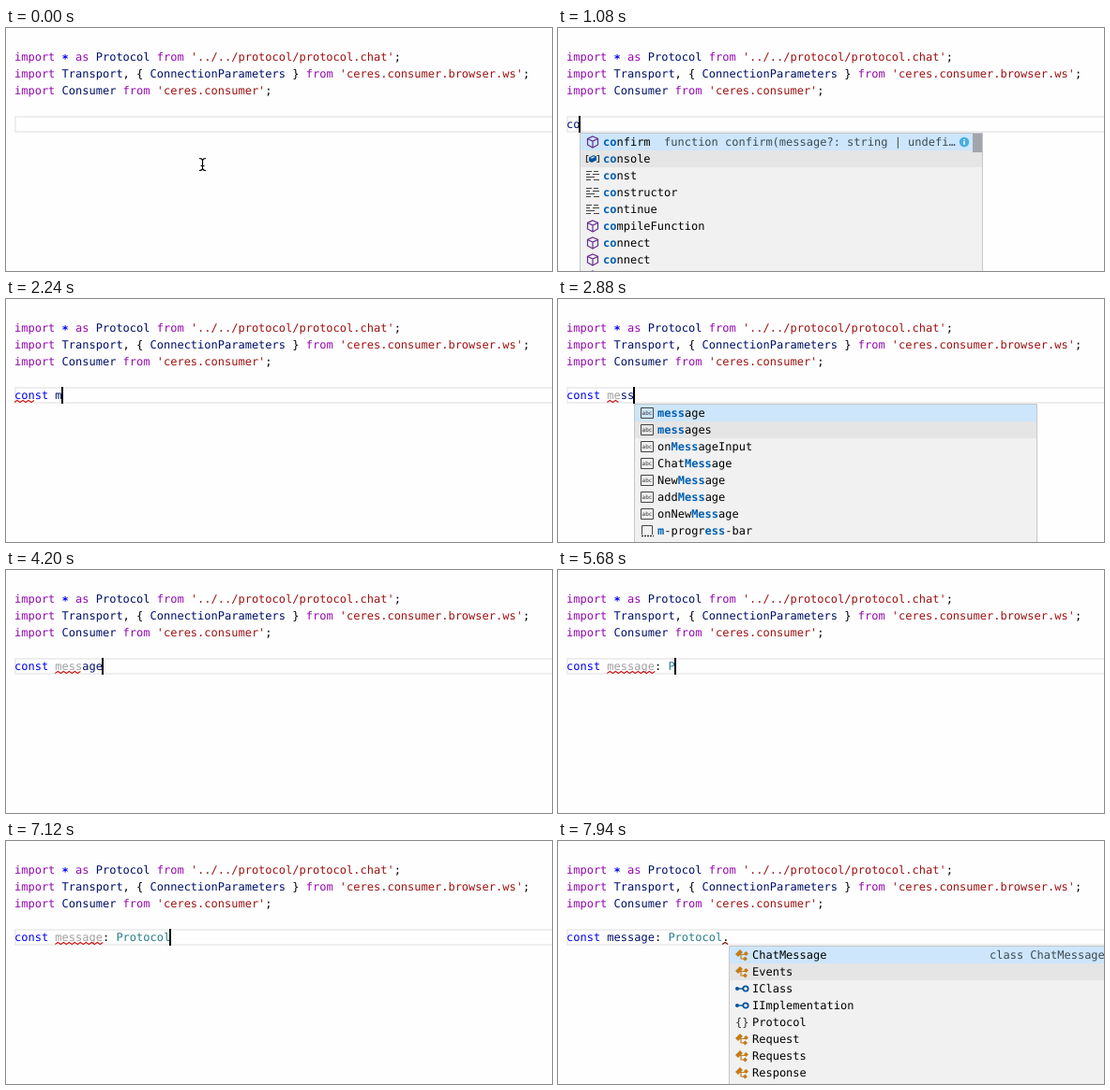
These frames come from a looping animation (582 px wide and 260 px high, 8000 ms). An HTML page:

```html
<!DOCTYPE html>
<html lang="en">
<head>
<meta charset="utf-8">
<title>Code completion</title>
<style>
html, body { margin: 0; width: 100%; height: 100%; overflow: hidden; background: #fefefe; }
svg { display: block; }
text { font: 12px "DejaVu Sans Mono", monospace; white-space: pre; text-rendering: geometricPrecision; }
</style>
</head>
<body>
<svg id="stage" width="582" height="260" viewBox="0 0 582 260"></svg>
<script>
const LOOP = 8000, CHAR = 7.224, LEFT = 9, ROW = 18, LAG = 100, BLINK = 520;
const NAVY = '#001068', PURPLE = '#9408b0', RED = '#9c1212', BLUE = '#0000f0',
      TEAL = '#267f88', GRAY = '#a0a0a0', BLACK = '#000';

// typed text: [time, characters]
const keys = [
  [300, ''], [780, 'c'], [980, 'o'], [1300, 'n'], [1620, 's'], [1820, 't'], [2020, ' '],
  [2240, 'm'], [2440, 'e'], [2620, 's'], [2760, 's'], [3920, 'age'],
  [5220, ':'], [5420, ' '], [5680, 'P'], [5900, 'r'], [6040, 'o'], [6160, 't'],
  [7120, 'ocol'], [7420, '.']
];
// how many letters of the variable are marked as unused: [time, count]
const unused = [[0, 0], [2800, 2], [3300, 4], [4400, 7], [7600, 0]];

const list = s => s.split(';').map(e => e.split('/'));
const popups = [
  { from: 860, to: 2020, word: 0, bar: true, items: list(
    'cube/confirm/function confirm(message?: string | undefi…;vari/console/var console: Console' +
    ';keyw/const;keyw/constructor;keyw/continue;cube/compileFunction;cube/connect;cube/connect;cube/count') },
  { from: 2340, to: 3920, word: 6, items: list(
    'abc/message;abc/messages;abc/onMessageInput;abc/ChatMessage;abc/NewMessage;abc/addMessage;' +
    'abc/onNewMessage;snip/m-progress-bar;snip/m-progress-ring') },
  { from: 5960, to: 7120, word: 15, bar: true, items: list(
    'vari/ProcessingInstruction/interface ProcessingInstruct…;vari/ProgressEvent;face/ProgressEventInit;' +
    'vari/Promise;face/PromiseConstructor;clas/PromiseConstructorLike;face/PromiseLike;' +
    'vari/PromiseRejectionEvent;face/PromiseRejectionEventInit;brac/Protocol/import Protocol') },
  { from: 7520, to: LOOP, word: 24, width: 660, items: list(
    'clas/ChatMessage/class ChatMessage;clas/Events;face/IClass;face/IImplementation;brac/Protocol;' +
    'clas/Request;clas/Requests;clas/Response;clas/Shared') }
];

const line = (d, color, w = 1) => `<path d="${d}" fill="none" stroke="${color}" stroke-width="${w}"/>`;
const fill = (d, color) => `<path d="${d}" fill="${color}"/>`;
const rect = (x, y, w, h, color) => `<rect x="${x}" y="${y}" width="${w}" height="${h}" fill="${color}"/>`;
const span = (s, color, bold) =>
  `<tspan fill="${color}"${bold ? ' font-weight="700"' : ''}>${s}</tspan>`;
const text = (x, y, body) => `<text x="${x}" y="${y}">${body}</text>`;
const code = (y, ...parts) => text(LEFT, y, parts.map(([s, c]) => span(s, c)).join(''));
const column = n => LEFT + n * CHAR;

const icons = {
  cube: line('M0-6L5.5-3.5V3L0 6-5.5 3V-3.5ZM-5.5-3.5L0-1 5.5-3.5M0-1V6', '#652d90', 1.2),
  vari: line('M-4.5-3.5h-2v7h2M4.5-3.5h2v7h-2', '#333', 1.2) +
        fill('M-4-1.5L1-4 4-2.5V1.5L-1 4-4 2.5Z', '#00539c') + fill('M-2.5-1L1-2.8 2.5-2-1-.3Z', '#e0ecf4'),
  keyw: line('M-7-4.5h6m2 0h5M-7-1.5h4m3 0h7M-7 1.5h9M-7 4.5h5m3 0h6', '#444'),
  abc: line('M-6.5-5.5h13v11h-13Z', '#444') +
       '<text y="2" text-anchor="middle" style="font-size:6px" fill="#333">abc</text>',
  snip: line('M-5.5 4V-5.5h11V4', '#444') + line('M-6 5.5h2m1 0h2m1 0h2m1 0h2m1 0h1', '#333', 1.5),
  face: '<circle cx="-5" r="2" fill="#00539c"/>' + line('M-4 0H1', '#00539c', 1.4) +
        '<circle cx="4" r="2.7" fill="none" stroke="#00539c" stroke-width="1.8"/>',
  clas: fill('M-7-1L-2-6 1-3-4 2ZM2-2L4.5-4 7-1.5 4.5 1ZM1 4L3.5 1.5 6 4 3.5 6.5Z', '#c27d1a') +
        line('M-2-.5H4M-1 0V4H3', '#c27d1a', 1.2),
  brac: '<text x="-7" y="4" fill="#333">{}</text>'
};

const header =
  code(35, ['import   ', PURPLE], ['as ', PURPLE], ['Protocol ', NAVY], ['from ', PURPLE],
    ["'../../protocol/protocol.chat'", RED], [';', BLACK]) +
  text(column(7), 37, span('*', BLUE, true)) +
  code(53, ['import ', PURPLE], ['Transport', NAVY], [', { ', BLACK], ['ConnectionParameters', NAVY], [' } ', BLACK],
    ['from ', PURPLE], ["'ceres.consumer.browser.ws'", RED], [';', BLACK]) +
  code(71, ['import ', PURPLE], ['Consumer ', NAVY], ['from ', PURPLE], ["'ceres.consumer'", RED], [';', BLACK]);

const typed = t => keys.filter(k => k[0] <= t).map(k => k[1]).join('');
const latest = (steps, t) => steps.filter(s => s[0] <= t).pop();

// positions of the query letters inside a label, or null
function match(label, query) {
  const hits = [];
  let at = -1;
  for (const c of query.toLowerCase()) {
    at = label.toLowerCase().indexOf(c, at + 1);
    if (at < 0) return null;
    hits.push(at);
  }
  return hits;
}

function squiggle(from, to, color = '#c81818') {
  let d = `M${column(from)} 110.5`;
  for (let x = column(from) + 3, up = true; x <= column(to) + .5; x += 3, up = !up) d += `L${x} ${up ? 108.5 : 110.5}`;
  return line(d, color, 1.1);
}

function popup(p, t, chars) {
  const query = typed(t - LAG).slice(p.word);
  const prefix = item => item[1].toLowerCase().startsWith(query.toLowerCase());
  const rows = p.items.filter(item => match(item[1], query)).sort((a, b) => prefix(b) - prefix(a));
  const x = Math.round(column(chars)), w = p.width || 430, h = rows.length * ROW + 1;
  const inner = w - 1;
  let out = rect(x, 112, w, h, '#f1f1f1') + rect(x + 1, 113, inner, ROW, '#cde6fc');
  if (rows.length > 1) out += rect(x + 1, 131, inner, ROW, '#e5e5e5');
  rows.forEach(([icon, label, detail], i) => {
    const y = 122 + i * ROW, hits = match(label, query);
    const body = [...label].map((c, j) => hits.includes(j) ? span(c, '#005fb0', true) : c).join('');
    out += `<g transform="translate(${x + 14} ${y})">${icons[icon]}</g>` + text(x + 25, y + 4, body);
    if (i || !detail) return;
    const dx = p.bar ? x + 25 + (label.length + 2) * CHAR : 460;
    out += text(dx, y + 4, span(detail, '#3f4a52'));
    if (p.bar) out += `<circle cx="${x + 410}" cy="122" r="5.2" fill="#48aee0"/>` +
      line(`M${x + 410} 121v4m0-6v1.3`, '#fff', 1.4);
  });
  if (p.bar && rows.length > 8) out += rect(x + 419, 112, 11, 21, '#a2a6ac');
  return out + line(`M${x + .5} 112.5h${w - 1}v${h - 1}h${1 - w}Z`, '#c6c6c8');
}

function draw(t) {
  const s = typed(t), n = s.length, dim = latest(unused, t)[1], name = s.slice(6, 13);
  let out = header + '<rect x="10" y="95" width="600" height="16" fill="none" stroke="#eee" stroke-width="2"/>';
  out += code(107, [s.slice(0, 6), n > 4 ? BLUE : NAVY], [name.slice(0, dim), GRAY], [name.slice(dim), NAVY],
    [s.slice(13, 15), BLACK], [s.slice(15, 23), TEAL], [s.slice(23), BLACK]);
  if (t >= 1560 && t < 2400) out += squiggle(0, 3);
  if (dim) out += squiggle(6, 6 + dim);
  if (t >= 7700) out += squiggle(23, 24, '#701008');
  const key = latest(keys, t);
  if (key && Math.floor((t - key[0]) / BLINK) % 2 === 0) out += rect(Math.round(column(n)) - 1, 94, 2, 18, BLACK);
  const open = popups.find(p => t >= p.from && t < p.to);
  if (open) out += popup(open, t, n);
  if (t < 780) out += line('M206 139.5q3 0 3.5 2q.5-2 3.5-2M209.5 141V151M206 152.5q3 0 3.5-2q.5 2 3.5 2M207.5 147.5h4', BLACK, 1.2);
  return out;
}

const stage = document.getElementById('stage');
let shown = '', start = null;
function frame(now) {
  if (start === null) start = now;
  const next = draw((now - start) % LOOP);
  if (next !== shown) stage.innerHTML = shown = next;
  requestAnimationFrame(frame);
}
requestAnimationFrame(frame);
</script>
</body>
</html>
```
